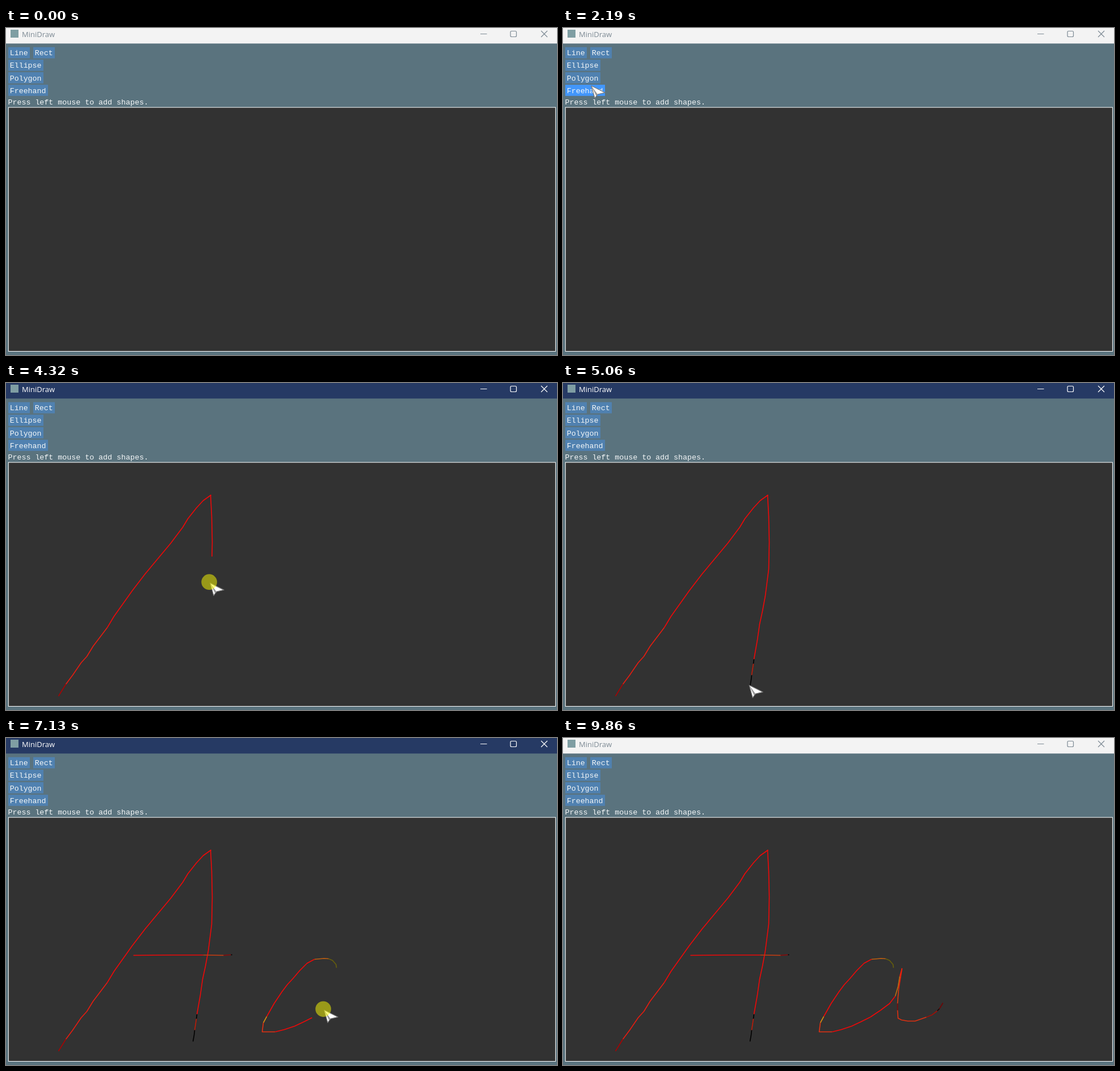
Write an HTML page that moves like this. It is 971 px wide and 577 px high and loops after 9930 ms.

```html
<!DOCTYPE html>
<html lang="en">
<head>
<meta charset="utf-8">
<title>MiniDraw</title>
<style>
  html, body { margin: 0; width: 100%; height: 100%; overflow: hidden; background: #5a737e; }
  svg { display: block; }
  .title { font: 13px "Open Sans", "Noto Sans", sans-serif; }
  .ui { font: 13.3px "Liberation Mono", "DejaVu Sans Mono", monospace; fill: #f4f7f8; white-space: pre; }
  #bar { --ink: #7d8a94; --back: #f3f3f3; }
  #bar.active { --ink: #fff; --back: #263a64; }
  #bar .back { fill: var(--back); }
  #bar text { fill: var(--ink); }
  #bar path { fill: none; stroke: var(--ink); stroke-width: 1.2; }
  polyline { fill: none; stroke-width: 1.6; stroke-linejoin: round; }
</style>
</head>
<body>
<svg width="971" height="577" viewBox="0 0 971 577">
  <rect width="971" height="577" fill="#5a737e"/>
  <g id="bar">
    <rect class="back" width="971" height="27.4"/>
    <rect x="8" y="3" width="14" height="14" fill="#7f9ea3"/>
    <text class="title" x="28" y="15.5">MiniDraw</text>
    <path d="M836 10.5h11.5M891 5.5h6.5q2 0 2 2v6q0 2-2 2h-6.5q-2 0-2-2v-6q0-2 2-2zM943 5l11 11m0-11l-11 11"/>
  </g>
  <g id="buttons"></g>
  <text class="ui" x="3.5" y="134.5">Press left mouse to add shapes.</text>
  <rect x="4.3" y="140.1" width="964.1" height="430.4" fill="#323232" stroke="#fff"/>
  <g id="ink" transform="translate(.5 .5)"></g>
  <g id="pointer">
    <path d="M1 1L25 13L12 16L7 23Z" fill="#fff" stroke="#777" stroke-width="1.2" stroke-linejoin="round"/>
    <path d="M1 1L12 16L9.5 19Z" fill="#999"/>
    <circle id="press" cx="-.8" cy="-1" r="13.8" fill="#ff0" fill-opacity=".5"/>
  </g>
</svg>
<script>
const LOOP = 9930, STEP = 1000 / 15, LAG = 67;
const $ = id => document.getElementById(id);

function add(parent, tag, attrs, text = '') {
  const el = document.createElementNS('http://www.w3.org/2000/svg', tag);
  for (const key in attrs) el.setAttribute(key, attrs[key]);
  el.textContent = text;
  return parent.appendChild(el);
}

function button(label, x, y, width) {
  const box = add($('buttons'), 'rect', { x, y, width, height: 19.7, fill: '#5081b0' });
  add($('buttons'), 'text', { class: 'ui', x: x + 2.7, y: y + 14.5 }, label);
  return box;
}
button('Line', 4, 33.8, 38);
button('Rect', 48, 33.8, 38);
button('Ellipse', 4, 55.9, 62);
button('Polygon', 4, 78, 62);
const freehand = button('Freehand', 4, 100.1, 70);

// Pointer route: each leg starts where the previous one ended; a colour means the button is down.
const legs = [];
let clock = 190, last = [924, 570];
function leg(end, coords, color) {
  const path = [last];
  for (let i = 0; i < coords.length; i += 2) path.push([coords[i], coords[i + 1]]);
  const line = color && add($('ink'), 'polyline', { stroke: color });
  legs.push({ start: clock, end, path, line });
  clock = end;
  last = path[path.length - 1];
}

// Enter and click the Freehand button
leg(260, [915, 570]);
leg(460, []);
leg(960, [600, 380, 245, 235]);
leg(1120, [351, 197]);
leg(1260, []);
leg(1920, [180, 150, 49, 101]);
leg(2120, []);
leg(2190, [], 'none');
leg(2580, []);
leg(2920, [361, 197]);

// Left side of the A
leg(3280, [347, 207, 335, 220, 320, 239, 311, 254, 290, 282, 265, 312, 245, 336, 222, 366, 190, 411, 178, 431], '#f00808');
leg(3460, [153, 464, 142, 482, 132, 493, 117, 515, 105, 531], '#e81c10');
leg(3520, [92, 552], '#a80404');
leg(3590, [], 'none');
leg(4060, [220, 385, 360, 197]);
leg(4110, []);

// Right side
leg(4530, [362, 235, 363, 280, 362, 328, 356, 375, 351, 402, 346, 425, 342, 453, 336, 487], '#f00808');
leg(4620, [335, 495], '#000');
leg(4740, [332, 515], '#c01c08');
leg(4950, [331, 524, 329, 535], '#000');
leg(5080, [327, 532]);
leg(5520, [224, 383]);
leg(5590, []);

// Crossbar
leg(5880, [290, 382.5, 347, 382.5], '#f00808');
leg(5970, [383, 383], '#c83c10');
leg(6020, [396, 382], '#900808');
leg(6060, [398, 382], '#000');
leg(6530, [582, 405]);
leg(6590, []);

// Small a
leg(6660, [581, 399, 575, 392, 568, 389], '#665f0c');
leg(6700, [560, 388.5, 543, 390], '#c06010');
leg(6870, [530, 397, 517, 410, 506, 423, 495, 435, 486, 447, 472, 468, 459, 491], '#f00808');
leg(6900, [453, 502], '#d88a10');
leg(6960, [451, 518, 474, 518], '#e83010');
leg(7070, [490, 514, 508, 508, 525, 500, 541, 492], '#f00808');
leg(7130, [559, 480], '#f00808');
leg(7240, [575, 468, 585, 455], '#f00808');
leg(7330, [590, 438, 593, 420], '#c07010');
leg(7390, [597, 406], '#f01c10');
leg(7520, [594, 424, 591, 443], '#f02008');
leg(7590, [589, 468], '#d83c10');
leg(7640, [589, 480], '#800808');
leg(7800, [590, 494, 596, 497, 607, 499, 620, 499, 640, 492], '#e03010');
leg(7860, [650, 488, 659, 481], '#a01008');
leg(7890, [663, 477], '#200');
leg(7920, [669, 467], '#700404');
leg(8120, [], 'none');

// Leave
leg(8250, [754, 547]);
leg(8450, []);
leg(8790, [840, 553, 908, 579]);

// The part of a path covered at fraction k of its length.
function cut(path, k) {
  const sizes = path.slice(1).map(([x, y], i) => Math.hypot(x - path[i][0], y - path[i][1]));
  let left = k * sizes.reduce((a, b) => a + b, 0);
  const out = [path[0]];
  for (let i = 0; i < sizes.length; i++) {
    const [x, y] = path[i], [u, v] = path[i + 1], f = sizes[i] ? Math.min(1, left / sizes[i]) : 1;
    out.push([x + (u - x) * f, y + (v - y) * f]);
    if (f < 1) break;
    left -= sizes[i];
  }
  return out;
}

const covered = (l, t) => cut(l.path, Math.max(0, Math.min(1, (t - l.start) / (l.end - l.start))));
const legAt = t => legs.find(l => t < l.end) || legs[legs.length - 1];
const pointAt = t => covered(legAt(t), t).pop();

function draw(now) {
  const t = Math.floor((now % LOOP + 14) / STEP) * STEP;
  const [x, y] = pointAt(t), [hx, hy] = pointAt(t - LAG);

  $('bar').classList.toggle('active', t > 2310 && t < 9850);
  const hover = hx > 4 && hx < 74 && hy > 100 && hy < 120;
  freehand.setAttribute('fill', !hover ? '#5081b0' : t > 2310 && t < 2370 ? '#0f87fa' : '#4296fa');

  for (const l of legs) {
    if (l.line) l.line.setAttribute('points', t - LAG > l.start ? covered(l, t - LAG).join(' ') : '');
  }

  $('pointer').style.display = t < 190 || t > 8785 ? 'none' : '';
  $('pointer').setAttribute('transform', `translate(${x} ${y})`);
  $('press').style.display = legAt(t).line && t < 8120 ? '' : 'none';
}

const begin = performance.now();
function tick() {
  draw(performance.now() - begin);
  requestAnimationFrame(tick);
}
tick();
</script>
</body>
</html>
```
